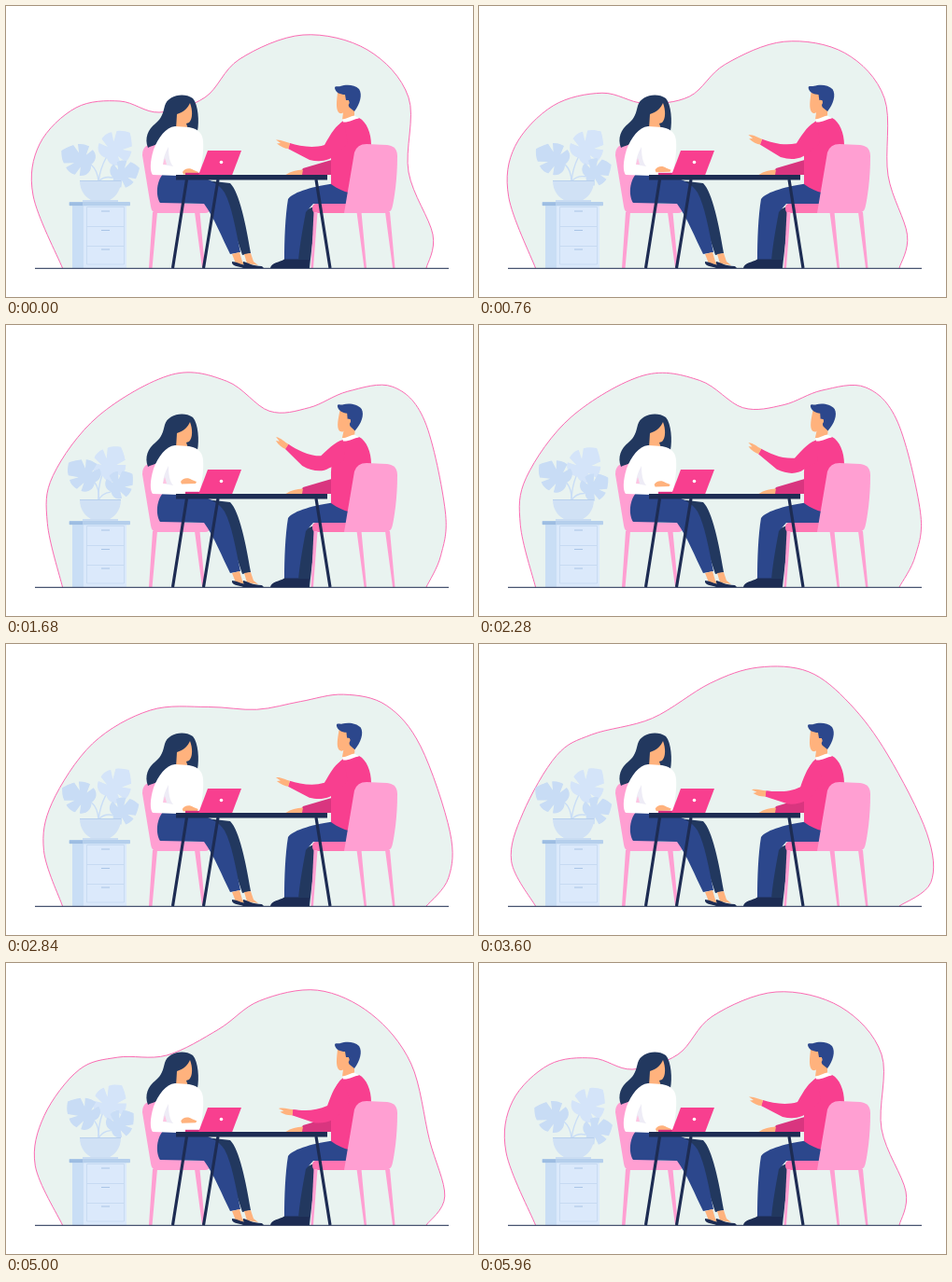
Write an HTML page that moves like this. It is 500 by 312 pixels and loops after 6.08 s.

```html
<!DOCTYPE html>
<html lang="en">
<head>
<meta charset="utf-8">
<title>Meeting at a table</title>
<style>
html, body { margin: 0; width: 100%; height: 100%; overflow: hidden; background: #fff; }
svg { display: block; width: 500px; height: 312px; }
.skin { fill: #ffb27d; }
.ink { fill: #1d2c53; }
.navy { fill: #2c478c; }
.deep { fill: #22385f; }
.pink { fill: #f83f8f; }
.rose { fill: #ff9fd2; }
.stem { fill: none; stroke: #c9ddf6; stroke-width: 1.4; }
</style>
</head>
<body>
<svg viewBox="0 0 500 312">
  <defs>
    <path id="leaf" d="M0 0C-6 4-14 1-16-6L-7-9-17-11C-18-16-16-21-14-23L-6-17-11-27C-8-31-4-33 0-35 5-32 9-28 11-26L6-17 14-22C17-17 17-13 17-10L7-9 15-5C13 1 6 4 0 0Z"/>
  </defs>

  <path id="blob" fill="#e9f3f0" stroke="#fb5cab" stroke-width=".9"/>

  <g id="plant">
    <g id="leafTop">
      <path class="stem" d="M99 188Q101 174 107 163L120 148"/>
      <use href="#leaf" transform="translate(108 163) rotate(42) scale(1.05)" fill="#d4e4f9"/>
    </g>
    <g id="leafLeft">
      <path class="stem" d="M99 188Q98 176 91 170L78 164"/>
      <use href="#leaf" transform="translate(91 170) rotate(-65)" fill="#c8dcf5"/>
    </g>
    <g id="leafRight">
      <path class="stem" d="M99 188Q105 182 114 184L127 179"/>
      <use href="#leaf" transform="translate(115 184) rotate(70) scale(.85)" fill="#c9ddf6"/>
    </g>
    <path fill="#d0e1f5" d="M79 187.500H123C123 199 116 206 109 209H93C86 206 79 199 79 187.500Z"/>
    <path fill="none" stroke="#b8d0ec" d="M79 187.500H123"/>
    <path fill="#c9dcf2" d="M82 208H120V210H82Z"/>
  </g>

  <g id="cabinet">
    <path fill="#c9def5" d="M71 214H83V281H71Z"/>
    <path fill="#dbe9fb" d="M83 214H129V281H83Z"/>
    <path fill="none" stroke="#c3d7f0" stroke-width=".8" d="M86.500 215.500H126.500V277H86.500ZM86.500 236.500H126.500M86.500 257.500H126.500"/>
    <path fill="none" stroke="#a9c4e6" stroke-width="1.200" d="M102 220H111M102 240.500H111M102 261H111"/>
    <rect x="67.500" y="210" width="65.500" height="4.200" rx="1" fill="#b5cfec"/>
    <path fill="#9dbde2" d="M68 210.500H82V214H68Z"/>
  </g>

  <g id="womanChair" class="rose">
    <path d="M146 160Q146 148 158 148H176L192 212H215Q219 213 219 217 218 222 213 222H161Q156 222 155 215Z"/>
    <path d="M157 221H162L156.500 281H153ZM202 221H207.500L213 281H210Z"/>
  </g>

  <g id="woman">
    <path class="deep" d="M170 107C173 96 190 92 200 99 206 106 207 124 205 134L190 133 181 131C174 147 160 148 152 152 148 142 152 132 160 126 167 120 168 115 170 107Z"/>
    <path class="skin" d="M197 104C200 112 200 121 196 125L193 126 195 132H182L183 116C190 114 195 109 197 104Z"/>
    <path class="deep" d="M205 186L240 190C250 200 257 235 262 265L253 267C246 245 238 222 228 205Z"/>
    <path class="navy" d="M168 180C160 190 161 205 165 211L212 212C222 225 232 250 240 266L251 264C246 240 242 215 234 200 228 190 215 184 200 181Z"/>
    <path class="skin" d="M242 266L250 264 253 274 258 278 246 276ZM255 266L262 265 265 274 270 278 258 276Z"/>
    <path class="ink" d="M242 274C246 274 250 277 263 279.500V281H254C249 279 241 279 242 274ZM254 274C259 275 264 279 274 279L276 281H264C259 279 253 279 254 274Z"/>
    <path fill="#fff" d="M181 129C171 130 163 141 158 154 154 167 154 177 157 181L185 182H207C210 170 213 148 210 140 208 133 201 131 196 130Z"/>
    <path fill="#eeecf6" d="M174 151C170 158 168 164 168 170L179 172C175 167 174 160 174 151Z"/>
    <path fill="#ffc4e2" d="M170 163L168 170H172Z"/>
    <path id="typing" class="skin" d="M189 178C191 174 197 173 201 176L206 178 205 180 190 180.500Z"/>
  </g>

  <g id="man">
    <path class="deep" d="M318 220L332 214C330 240 327 262 325 281H311Z"/>
    <path fill="#ff74b2" d="M332 212H368V222H332Q328 222 328 217 328 212 332 212Z"/>
    <path class="rose" d="M329.500 221H333.500L329 281H326.500Z"/>
    <path class="navy" d="M354 190C330 193 308 199 302 207 299 225 298 250 298 273H313C315 252 319 232 321 221L329 212H368L374 192Z"/>
    <path class="ink" d="M283 281C284 275 293 275 298 271.500H313V281ZM312 281V272H325L324 281Z"/>
    <path fill="#d9357f" d="M352 164L318 174 313 181H352Z"/>
    <path class="skin" d="M318 175.500C311 176 305 177 299.500 181H317Z"/>
    <g id="head">
      <path class="skin" d="M355 93C354 102 353 110 356 114 358 116 361 115 361 114L360 122 373 120 373 100 366 92Z"/>
      <path class="navy" d="M352 88C352 85 356 87 358 86 364 84 373 84 378 89 382 95 379 105 373 113L368 109C366 107 367 104 367 101L364 101 363 95C358 95 353 93 352 88Z"/>
      <circle class="skin" cx="365" cy="103.500" r="2.600"/>
    </g>
    <path class="pink" d="M361 123C351 130 348 148 348 162V191C355 196 362 199 367 200L376 156 391 149C391 136 386 124 378 120Z"/>
    <g id="arm">
      <path class="pink" d="M362 124C353 127 348 137 341 149 328 153 314 150 304 147L302 153 325 165C338 168 348 165 353 159L366 148Z"/>
      <path class="skin" d="M304 147C299 146 295 143 289 143.500L294 147 290 147.500C294 151 299 153 302.500 153Z"/>
    </g>
    <path fill="#fff" d="M360 121.500C365 121 369 118 373 117.500L378 120.500C373 121 367 125 361 124.500Z"/>
  </g>

  <g id="table">
    <path fill="#d62f7e" d="M192 178.800H210V181.500H192Z"/>
    <path class="pink" d="M216 155H252L242 181.500H206Z"/>
    <circle cx="230.500" cy="167.500" r="1.800" fill="#fff"/>
    <path fill="none" stroke="#1d2c53" stroke-width="3.200" d="M193.500 186L178.500 281M227 186L211.500 281M332 186L347 281"/>
    <path class="ink" d="M182 181H344V186.500H182Z"/>
  </g>

  <g id="manChair" class="rose">
    <path d="M373 157Q376 148 386 148L408 149Q419 150 419 161C419 185 416 205 413.500 216Q412 222 405 222H362Z"/>
    <path d="M375.500 221H380.500L386 281H383.500ZM406 221H411L416.500 281H414Z"/>
  </g>
  <path fill="none" stroke="#1b2a4e" d="M31 281.300H474"/>
</svg>

<script>
const LOOP = 6080, STEP = 40;
const $ = id => document.getElementById(id);

// Key points of the outline, from the left end on the floor to the right.
const points = s => s.split(" ").map(p => p.split(",").map(Number));
const wide = points("29,203 36,148 75,109 122,102 164,114 213,98 250,57 318,31 387,47 431,98 431,178 457,245");
const saddle = points("45,213 51,162 100,97 180,51 240,58 285,92 328,90 368,73 415,67 449,103 472,200 466,247");
const peak = points("34,234 47,182 82,121 117,100 182,81 245,39 297,21 352,27 396,64 437,120 480,203 485,256");

// Steps of [time, value]; a value is a number or a list of points.
const tracks = {
  blob: [[280, wide], [1920, saddle], [3950, peak], [5960, wide]],
  sway: [[280, 0], [1680, 1], [3200, 0], [4700, 1], [5960, 0]],
  arm: [[280, 0], [1700, 17], [3700, -9.5], [4850, -9.5], [5960, 0]],
  head: [[280, 0], [1700, 5], [2300, 5], [3600, 0]]
};

const ease = p => p < .5 ? 2 * p * p : 1 - 2 * (1 - p) ** 2;
const mix = (a, b, p) => Array.isArray(a) ? a.map((v, i) => mix(v, b[i], p)) : a + (b - a) * p;

function at(track, t) {
  const i = track.findIndex(step => step[0] > t);
  if (i === 0) return track[0][1];
  if (i < 0) return track[track.length - 1][1];
  const [t0, a] = track[i - 1], [t1, b] = track[i];
  return mix(a, b, ease((t - t0) / (t1 - t0)));
}

// Smooth curve through all points, with fixed ends on the floor.
function curve(inner) {
  const pts = [[60.5, 281], ...inner, [450, 281]];
  const handle = (p, from, to) => p.map((v, k) => v + (to[k] - from[k]) / 6);
  let d = "M" + pts[0];
  for (let i = 0; i < pts.length - 1; i++) {
    const p = pts[i], q = pts[i + 1], before = pts[i - 1] || p, after = pts[i + 2] || q;
    d += "C" + [handle(p, before, q), handle(q, after, p), q].join(" ");
  }
  return d;
}

const turn = (id, deg, x, y) => $(id).setAttribute("transform", `rotate(${deg} ${x} ${y})`);

function draw(time) {
  const t = Math.floor((time % LOOP) / STEP) * STEP;
  const sway = at(tracks.sway, t);
  $("blob").setAttribute("d", curve(at(tracks.blob, t)));
  turn("leafLeft", 12 * sway, 99, 188);
  turn("leafTop", -10 * sway, 99, 188);
  turn("leafRight", -20 * sway, 99, 188);
  $("typing").setAttribute("transform", `translate(${-2 * sway} ${-10 * sway})`);
  turn("arm", at(tracks.arm, t), 368, 132);
  turn("head", at(tracks.head, t), 368, 120);
}

const start = performance.now();
function tick() {
  draw(performance.now() - start);
  requestAnimationFrame(tick);
}
tick();
</script>
</body>
</html>
```
